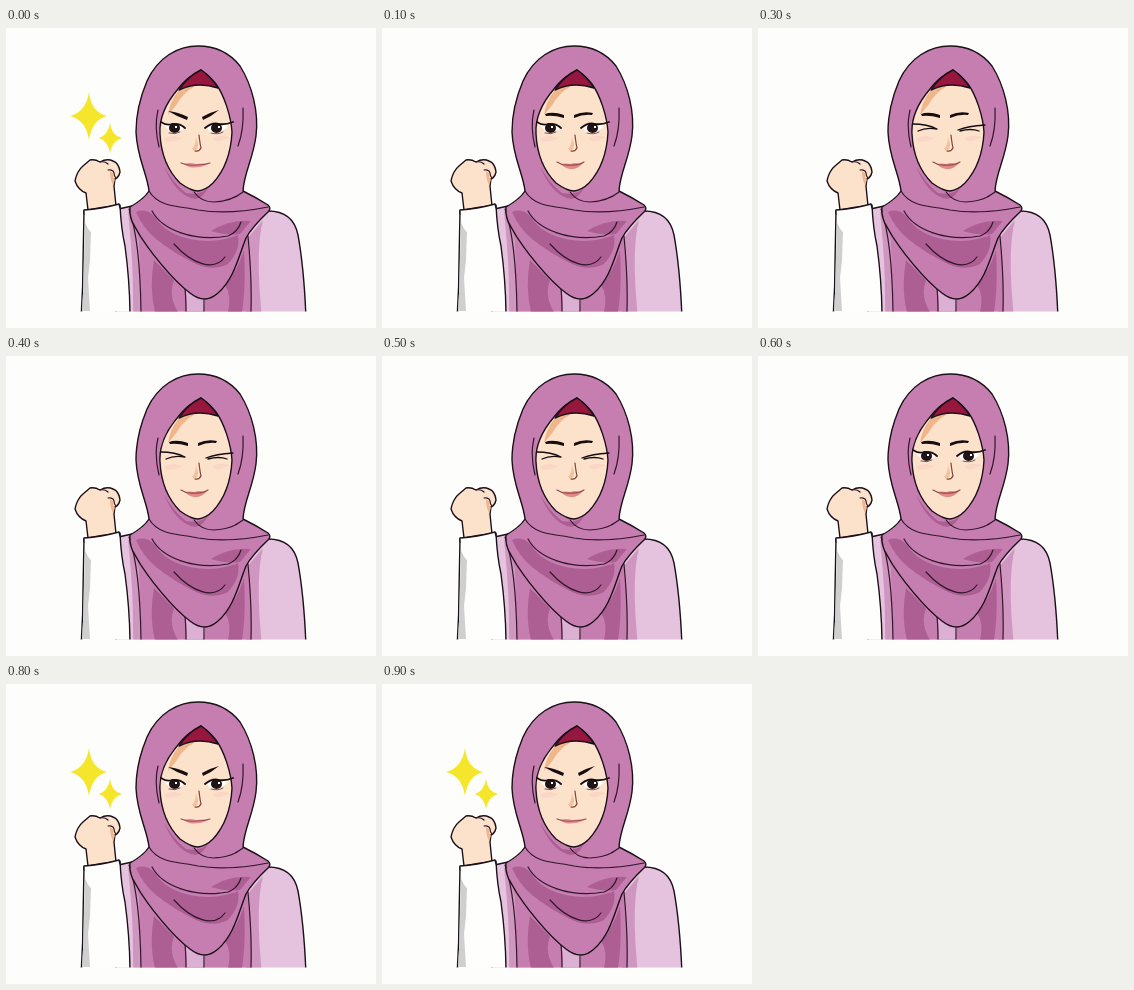
Animation of 370x300 px, one loop 1 s. Source, as an HTML page:

```html
<!DOCTYPE html>
<html lang="en">
<head>
<meta charset="utf-8">
<title>Fist pump</title>
<style>
html, body { margin: 0; width: 100%; height: 100%; overflow: hidden; background: #fdfefb; }
svg { display: block; width: 370px; height: 300px; }
path { stroke-linejoin: round; stroke-linecap: round; }
.ink { stroke: #1b1019; stroke-width: 1.4; }
.line { fill: none; stroke: #32172c; stroke-width: 1.2; }
.cloth { fill: #c67db0; }
.shade { fill: #ad5f93; }
.mid { fill: #cf97c0; }
.skin { fill: #fce1cb; }
.tan { fill: #efb58b; }
.blush { fill: #fad6c6; }
.brow { fill: #160d10; }
.lash { fill: none; stroke: #160d10; stroke-width: 1.8; }
</style>
</head>
<body>
<svg viewBox="0 0 370 300">
  <defs><clipPath id="crop"><path d="M0 0H370V283.5H0Z"/></clipPath></defs>
  <g clip-path="url(#crop)">
    <!-- jacket and hanging cloth -->
    <path class="ink" fill="#e5c2dd" d="M108 182L126 178 262 183C279 183 289 192 292 207Q298 240 300 290H110Z"/>
    <path class="mid" d="M122 183L134 205 136 290H127Q128 240 122 183ZM240 212L257 192Q249 222 256 290H240Z"/>
    <path class="cloth" d="M123 182L133 212 135 290H245Q247 245 242 208L150 190Z"/>
    <path class="shade" d="M148 232Q143 260 149 284H172Q162 268 168 252ZM219 257Q231 244 238 222Q240 260 236 284H222Q226 268 219 257Z"/>
    <path fill="#dcb0d2" d="M180 262L199 271 198 290H181Z"/>
    <path class="line" d="M123 181Q134 212 135 284M179 261Q180 270 180 284M198 272V284M242 208Q246 250 245 284"/>

    <!-- scarf -->
    <path class="ink cloth" d="M192 18C172 18 152 29 141 53C133 72 130 88 130 104C131 130 141 145 143 163Q138 171 124 179Q123 190 129 199C142 223 169 254 184 265Q199 277 212 265C228 251 232 230 240 210Q246 199 263 183Q265 180 262 177Q251 170 237 163C238 145 247 131 250 108C253 84 246 57 234 38C223 24 209 18 192 18Z"/>
    <path class="shade" d="M158 138Q167 155 180 165 193 168 202 160Q196 171 189 171 170 168 158 138ZM130 184Q142 179 151 192C166 212 203 219 232 207Q235 222 222 236Q206 244 188 235Q166 224 150 211Q137 200 130 184ZM205 203Q224 191 245 193L234 206Q221 208 205 203Z"/>
    <path class="line" d="M143 163C153 180 175 178 192 182Q222 187 262 179M188 164Q195 174 208 174Q226 173 237 164M146 183C156 202 188 214 222 208Q232 204 235 194M168 216C186 236 208 244 219 229M152 82Q148 99 153 119M237 80Q238 102 232 118"/>

    <!-- face -->
    <path class="ink skin" d="M195 42Q181 49 172 61C160 75 153 91 154 106C155 126 161 142 174 155Q185 163 192 163Q200 162 207 155C218 143 225 125 226 104C225 88 218 67 210 56Q203 47 195 42Z"/>
    <path class="tan" d="M173 62Q181 58 189 58Q177 65 171 76L162 87Q164 73 173 62Z"/>
    <path class="ink" fill="#98173f" d="M195 42Q181 49 173 62Q191 53 212 60Q204 48 195 42Z"/>
    <path class="blush" d="M158 110Q168 106 176 110Q169 115 159 113ZM207 110Q215 106 223 109Q218 114 207 113Z"/>
    <path fill="#f2bf9b" d="M190 109Q190 117 186 121L189 123Q192 120 192 117Z"/>
    <path class="line" d="M193 107Q194 116 195 120Q193 124 189 123" style="stroke:#7b4638"/>

    <!-- expressions -->
    <g id="calm">
      <path class="brow" d="M163 86Q171 83 182 87L182 90Q172 87 164 88ZM192 87Q201 83 211 85L210 87Q201 86 192 90Z"/>
    </g>
    <g id="fierce">
      <path class="brow" d="M162 83Q172 84 182 89L181 92Q170 88 162 83ZM196 89Q205 84 213 82Q206 88 197 92Z"/>
    </g>
    <g id="open">
      <path fill="#fff" d="M158 97Q169 93 178 99Q175 105 165 105ZM200 99Q210 92 222 97Q218 105 205 105Z"/>
      <ellipse cx="168.500" cy="100" rx="5.500" ry="5" fill="#211213"/>
      <ellipse cx="210.500" cy="100" rx="5.500" ry="5" fill="#211213"/>
      <path class="lash" d="M155 94Q161 98 166 96Q174 95 179 100M199 100Q206 94 213 96Q219 97 227 94"/>
      <path fill="#fff" d="M169 98h2v2h-2ZM212 98h2v2h-2Z"/>
      <path class="line" d="M163 105Q169 107 174 104M205 105Q212 107 217 104" style="stroke-width:.7"/>
    </g>
    <g id="closed">
      <path class="lash" style="stroke-width:1.3" d="M155 96Q169 96 179 101Q168 99 160 103M200 102Q210 98 227 97M202 103Q213 100 221 103"/>
    </g>
    <g id="smile">
      <path fill="#df8c89" d="M179 136Q184 135 188 136Q194 134 200 136Q195 142 188 141Q182 140 179 136Z"/>
      <path class="line" d="M175 134Q181 138 188 137Q196 138 202 134" style="stroke:#9d4952"/>
    </g>
    <g id="smirk">
      <path fill="#df9290" d="M177 136Q185 134 190 136Q197 135 203 136Q192 141 183 139Z"/>
      <path class="line" d="M175 135Q183 138 190 137Q198 137 204 135" style="stroke:#9d4952"/>
    </g>

    <!-- raised arm -->
    <path id="sleeve" class="ink" fill="#fefefd"/>
    <path id="fold" fill="#cfcfcf"/>
    <g id="fist">
      <path class="ink skin" d="M82 182L80 165Q72 162 69 153Q71 143 77 138L84 132Q89 131 94 134Q101 130 107 133Q113 135 114 144Q113 149 109 151L108 158 110 178Q96 179 82 182Z"/>
      <path class="tan" d="M104 143Q108 145 107 149L109 152 107 157Q104 151 104 143Z"/>
      <path class="line" d="M94 134Q99 133 102 136M102 142Q107 141 108 145Q108 148 110 150"/>
    </g>
    <path id="cuff" class="ink" fill="#fefefd"/>
  </g>

  <g id="sparkles" fill="#f5e62b">
    <path d="M83 64Q85 84 101 88Q86 92 83 112Q80 92 64 88Q80 84 83 64Z"/>
    <path d="M104 95Q105 107 116 110Q106 113 104 125Q102 113 93 110Q102 107 104 95Z"/>
  </g>
</svg>
<script>
const el = id => document.getElementById(id);
const show = (id, on) => { el(id).style.display = on ? "" : "none"; };
const arms = {
  low: {
    sleeve: "M78 183L114 177Q115 200 119 218Q124 255 124 290H75Q77 262 77 234Z",
    fold: "M79 194Q82 202 85 204L84 232 82 250 84 283H76Q78 257 78 230Z",
    cuff: "M78 186L78 182Q95 181 113 176L114 180",
    lift: 0
  },
  high: {
    sleeve: "M78 162L114 156Q115 180 119 200Q126 242 124 266Q122 279 118 283H82Q75 276 75 261Q79 237 78 212Z",
    fold: "M79 176Q83 180 85 184L84 218Q81 243 84 265L89 282H82Q75 274 77 254Q79 229 79 210Z",
    cuff: "M78 165L78 161Q96 160 113 155L114 159",
    lift: -22
  }
};

function pose(step) {
  const fierce = step === 0 || step >= 7;
  const closed = step >= 3 && step < 6;
  const sparkle = step === 0 || step >= 8;
  const arm = step === 7 ? arms.high : arms.low;
  show("fierce", fierce);
  show("calm", !fierce);
  show("closed", closed);
  show("open", !closed);
  show("smirk", sparkle);
  show("smile", !sparkle);
  show("sparkles", sparkle);
  for (const id of ["sleeve", "fold", "cuff"]) el(id).setAttribute("d", arm[id]);
  el("fist").setAttribute("transform", `translate(0 ${arm.lift})`);
}

const start = performance.now();
function tick() {
  pose(Math.floor((performance.now() - start) % 1000 / 100));
  requestAnimationFrame(tick);
}
tick();
</script>
</body>
</html>
```
